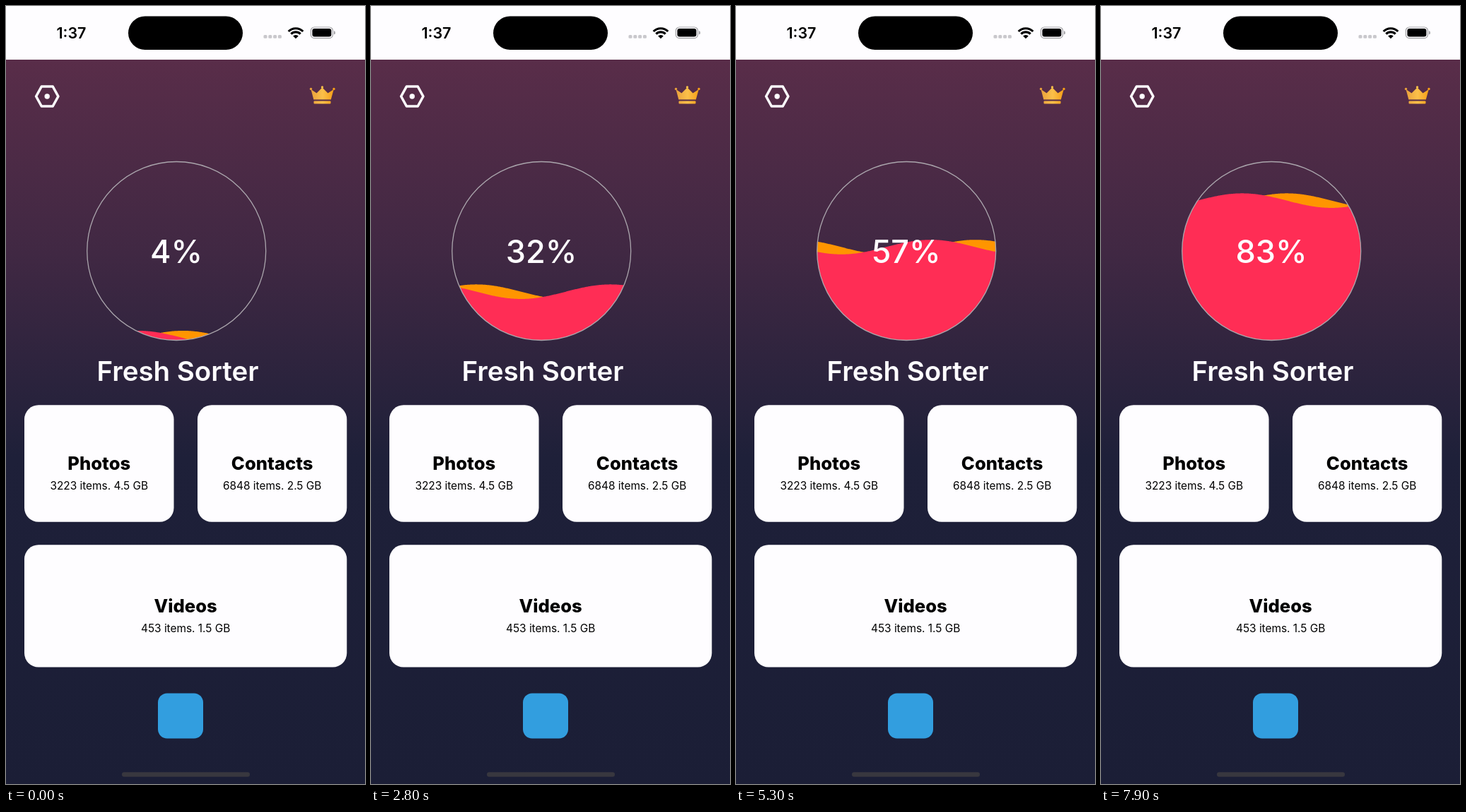
An HTML page with a canvas that plays this animation: 508 px wide and 1102 px high, repeating every 8 s.

```html
<!DOCTYPE html>
<html lang="en">
<head>
<meta charset="utf-8">
<title>Cleaner home screen</title>
<style>
  html, body { margin: 0; width: 100%; height: 100%; overflow: hidden; background: #1c1f37; }
  canvas { display: block; width: 508px; height: 1102px; }
</style>
</head>
<body>
<canvas id="stage" width="508" height="1102"></canvas>
<script>
const ctx = document.getElementById('stage').getContext('2d');
const W = 508, H = 1102;
const LOOP = 8000, STEP = 100;
const WHITE = '#fefdff';
const gauge = { x: 241.2, y: 347, r: 126.5 };

function box(x, y, w, h, r, color) {
  ctx.fillStyle = color;
  ctx.beginPath();
  ctx.roundRect(x, y, w, h, r);
  ctx.fill();
}

function disc(x, y, r, color) {
  ctx.fillStyle = color;
  ctx.beginPath();
  ctx.arc(x, y, r, 0, Math.PI * 2);
  ctx.fill();
}

function polygon(points) {
  ctx.beginPath();
  for (const [x, y] of points) ctx.lineTo(x, y);
  ctx.closePath();
}

function label(text, x, y, size, weight, color) {
  ctx.font = `${weight} ${size}px Inter, sans-serif`;
  ctx.textAlign = 'center';
  ctx.fillStyle = color;
  ctx.fillText(text, x, y);
}

function verticalGradient(y0, y1, stops) {
  const g = ctx.createLinearGradient(0, y0, 0, y1);
  for (const [at, color] of stops) g.addColorStop(at, color);
  return g;
}

function drawBackground() {
  ctx.fillStyle = verticalGradient(76, H, [
    [0, '#592d49'], [0.27, '#402843'], [0.55, '#1e2039'], [1, '#1b1e36']
  ]);
  ctx.fillRect(0, 0, W, H);
  ctx.fillStyle = WHITE;
  ctx.fillRect(0, 0, W, 76);
}

function drawStatusBar() {
  label('1:37', 92.5, 46, 21.5, 600, '#000');
  box(173, 14.5, 162, 47.5, 23.75, '#000');
  for (let i = 0; i < 4; i++) box(364.5 + i * 6.8, 41, 5, 4.8, 1.5, '#c9c8cc');

  // Wi-Fi: two arcs over a wedge
  const cx = 410, cy = 46.3, a0 = Math.PI * 1.25, a1 = Math.PI * 1.75;
  ctx.strokeStyle = '#000';
  ctx.lineWidth = 3.1;
  for (const r of [14.6, 9.4]) {
    ctx.beginPath();
    ctx.arc(cx, cy, r, a0, a1);
    ctx.stroke();
  }
  ctx.fillStyle = '#000';
  ctx.beginPath();
  ctx.moveTo(cx, cy);
  ctx.arc(cx, cy, 5.4, a0, a1);
  ctx.fill();

  ctx.strokeStyle = '#a2a2a5';
  ctx.lineWidth = 1.2;
  ctx.beginPath();
  ctx.roundRect(431.3, 30, 31.2, 15.6, 5);
  ctx.stroke();
  box(433.4, 32, 27, 11.6, 3.3, '#000');
  box(464, 35.3, 1.9, 5, [0, 2, 2, 0], '#a2a2a5');
}

function drawSettingsIcon() {
  ctx.strokeStyle = WHITE;
  ctx.lineWidth = 3.6;
  ctx.lineJoin = 'round';
  polygon([[42.6, 128], [50.3, 114], [66.2, 114], [73.9, 128], [66.2, 142], [50.3, 142]]);
  ctx.stroke();
  disc(58.2, 128, 3.7, WHITE);
}

function drawCrown() {
  const gold = ctx.createLinearGradient(432, 0, 464, 0);
  gold.addColorStop(0, '#e9a13c');
  gold.addColorStop(0.5, '#fbc04a');
  gold.addColorStop(1, '#f59d16');
  ctx.fillStyle = gold;
  polygon([[431.5, 118], [439.5, 123.5], [447.5, 115.5], [455.5, 123.5],
           [463.8, 118], [459.8, 132.5], [435.3, 132.5]]);
  ctx.fill();
  box(435.5, 134.5, 24, 4, 1, gold);
  for (const [x, y] of [[431.5, 117.5], [447.5, 115], [464, 117.5]]) disc(x, y, 1.7, gold);
}

function drawWave(crest, middle, color) {
  const { x, y, r } = gauge;
  ctx.fillStyle = color;
  ctx.beginPath();
  for (let px = x - r; px <= x + r + 1; px++) {
    ctx.lineTo(px, middle - 10.3 * Math.cos((px - crest) * Math.PI / r));
  }
  ctx.lineTo(x + r + 1, y + r);
  ctx.lineTo(x - r, y + r);
  ctx.fill();
}

function drawGauge(time) {
  const { x, y, r } = gauge;
  const percent = 4 + time / STEP;
  // The liquid follows the number with a smooth lag.
  const lag = 4.8;
  const level = percent - lag * (1 - Math.exp(-percent / lag));
  const middle = y + r - level * r / 50;
  const crest = 187 - 2 * r * time / 2000;

  ctx.save();
  ctx.beginPath();
  ctx.arc(x, y, r, 0, Math.PI * 2);
  ctx.clip();
  drawWave(crest + r / 2, middle, '#ff9500');
  drawWave(crest, middle, '#ff2d55');
  ctx.restore();

  ctx.strokeStyle = '#aaa5ac';
  ctx.lineWidth = 1.3;
  ctx.beginPath();
  ctx.arc(x, y, r, 0, Math.PI * 2);
  ctx.stroke();
  label(`${percent}%`, 241, 364, 45, 500, WHITE);
}

function drawCard(x, y, w, h, title, detail) {
  const cx = x + w / 2, base = y + (h > 170 ? 96 : 92);
  box(x, y, w, h, 20, WHITE);
  label(title, cx, base, 25.6, 800, '#000');
  label(detail, cx, base + 28, 15.4, 400, '#000');
}

function draw(now) {
  const time = Math.floor((now % LOOP) / STEP) * STEP;
  drawBackground();
  drawStatusBar();
  drawSettingsIcon();
  drawCrown();
  drawGauge(time);
  label('Fresh Sorter', 243, 531, 38.5, 600, WHITE);
  drawCard(26, 565.3, 211.5, 165.5, 'Photos', '3223 items. 4.5 GB');
  drawCard(271, 565.3, 211.3, 165.5, 'Contacts', '6848 items. 2.5 GB');
  drawCard(26, 763.3, 456.3, 173.3, 'Videos', '453 items. 1.5 GB');
  box(215, 973.5, 64, 64, 13, '#329edf');
  box(164, 1085.3, 181, 6.4, 3.2, '#38373f');
  requestAnimationFrame(draw);
}

requestAnimationFrame(draw);
</script>
</body>
</html>
```
